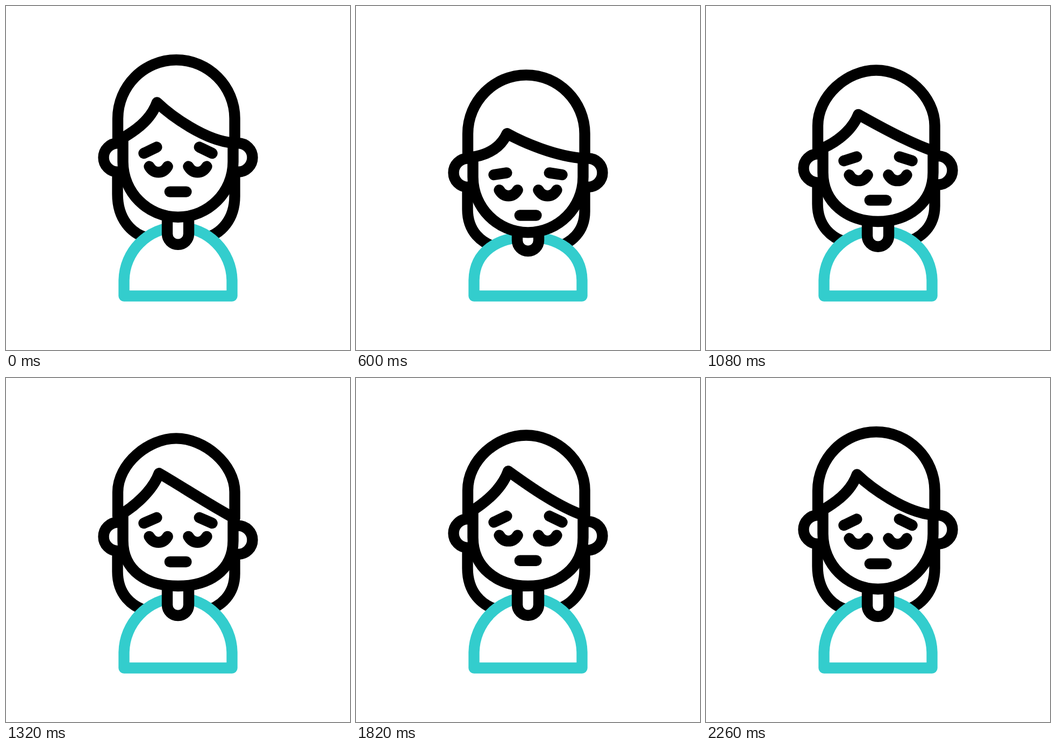
These frames come from a looping animation (640 px wide and 640 px high, 2.4 s). An HTML page:

```html
<!DOCTYPE html>
<html lang="en">
<head>
<meta charset="utf-8">
<title>Nodding sad woman</title>
<style>
  html, body { margin: 0; width: 100%; height: 100%; overflow: hidden; background: #fff; }
  svg { display: block; width: 100vw; height: 100vh; }
  path { fill: #fff; stroke: #000; stroke-width: 20.4; stroke-linecap: round; stroke-linejoin: round; }
  .line { fill: none; }
  #body { stroke: #33cdcd; }
</style>
</head>
<body>
<svg viewBox="0 0 640 640">
  <path id="back" class="line"/>
  <path id="body"/>
  <path id="neck"/>
  <path id="ears"/>
  <path id="face"/>
  <path id="hair"/>
  <path id="brows" class="line"/>
  <path id="eyes" class="line"/>
  <path id="mouth" class="line"/>
</svg>
<script>
const LOOP = 2400, STEP = 20, DOWN = 670, UP = 1415, LAG = 1600, END = 2260;
const mix = (a, b, p) => a + (b - a) * Math.min(1, Math.max(0, p));

// Rest, lowered and raised values; "hold" is when the return to rest begins.
function pose(t, rest, low, high, hold = UP) {
  if (t < DOWN) return mix(rest, low, t / DOWN);
  if (t < UP) return mix(low, high, (t - DOWN) / (UP - DOWN));
  return mix(high, rest, (t - hold) / (END - hold));
}

const set = (id, d) => document.getElementById(id).setAttribute('d', d);

function draw(t) {
  const k = (rest, low, high) => pose(t, rest, low, high);
  const lag = (rest, low, high) => pose(t, rest, low, high, LAG);

  // Hair behind the shoulders
  const side = k(0, 31.5, 7), ends = k(0, 20, -1), half = (side + ends) / 2;
  set('back', `M207.5 ${310 + side}V${350 + side}
    C207.5 ${395 + half} 232 ${425 + ends} 268 ${433 + ends}
    M425.5 ${310 + side}V${354 + side}
    C425.5 ${395 + half} 402 ${425 + ends} 366 ${433 + ends}`);

  const top = k(411.5, 431.8, 406);
  set('body', `M219.5 539.5V512C219.5 456.5 264.5 ${top} 320 ${top}
    S420.5 456.5 420.5 512V539.5Z`);

  const neck = k(423.8, 437.5, 419.8);
  set('neck', `M300 ${neck - 30}V${neck}a20 20 0 0 0 40 0V${neck - 30}`);

  const earL = lag(282, 313.5, 292.5), earR = lag(282, 313.5, 299.5), r = 26.7;
  set('ears', `M214 ${earL - r}H208.2a${r} ${r} 0 0 0 0 ${2 * r}H214
    M426 ${earR - r}H431.8a${r} ${r} 0 0 1 0 ${2 * r}H426`);

  // Face, ending under the fringe
  const cheek = lag(290, 321.5, 300), chin = k(392.7, 424.7, 381.5);
  const left = k(251, 286, 253), right = k(255, 287, 257.5);
  set('face', `M217.5 ${left - 2}V${cheek}
    C217.5 ${cheek + 56.6} 263.4 ${chin} 320 ${chin}
    S422.5 ${cheek + 56.6} 422.5 ${cheek}V${right}`);

  // Crown and fringe
  const crown = lag(100.3, 131.6, 109.6), temple = k(209.5, 241, 208);
  const h = k(60, 60, 51);
  const tx = k(281, 281, 285.3), ty = k(179.5, 244, 167.5);
  set('hair', `M208 ${left}V${temple}
    C208 ${temple - h} ${316.7 - h} ${crown} 316.7 ${crown}
    S425.6 ${temple - h} 425.6 ${temple}V${right}
    C${425.6 + k(-55, -55, -45)} ${right + k(-3, -3.5, -28)}
     ${tx + k(24, 29, 38)} ${ty + k(23, 15, 22)} ${tx} ${ty}
    C${tx - 12} ${ty + k(34, 26, 34)}
     ${208 + k(30, 36, 28)} ${left + k(-17, -2, -18)} 208 ${left}Z`);

  const outer = k(274, 318.7, 263), inner = k(262.6, 316, 251.5);
  set('brows', `M256.5 ${outer}L280.3 ${inner}M383.5 ${outer}L359.8 ${inner}`);

  const y = k(0, 49, -11.3);
  const eye = x => `M${x} ${298.5 + y}c4 7 10 10.8 17 10.8s13 -3.8 17 -10.8`;
  set('eyes', eye(266.6) + eye(339.4));
  set('mouth', `M304.8 ${345.6 + y}H335.4`);
}

const start = performance.now();
function tick() {
  const t = (performance.now() - start) % LOOP;
  draw(Math.floor(t / STEP) * STEP);
  requestAnimationFrame(tick);
}
tick();
</script>
</body>
</html>
```
